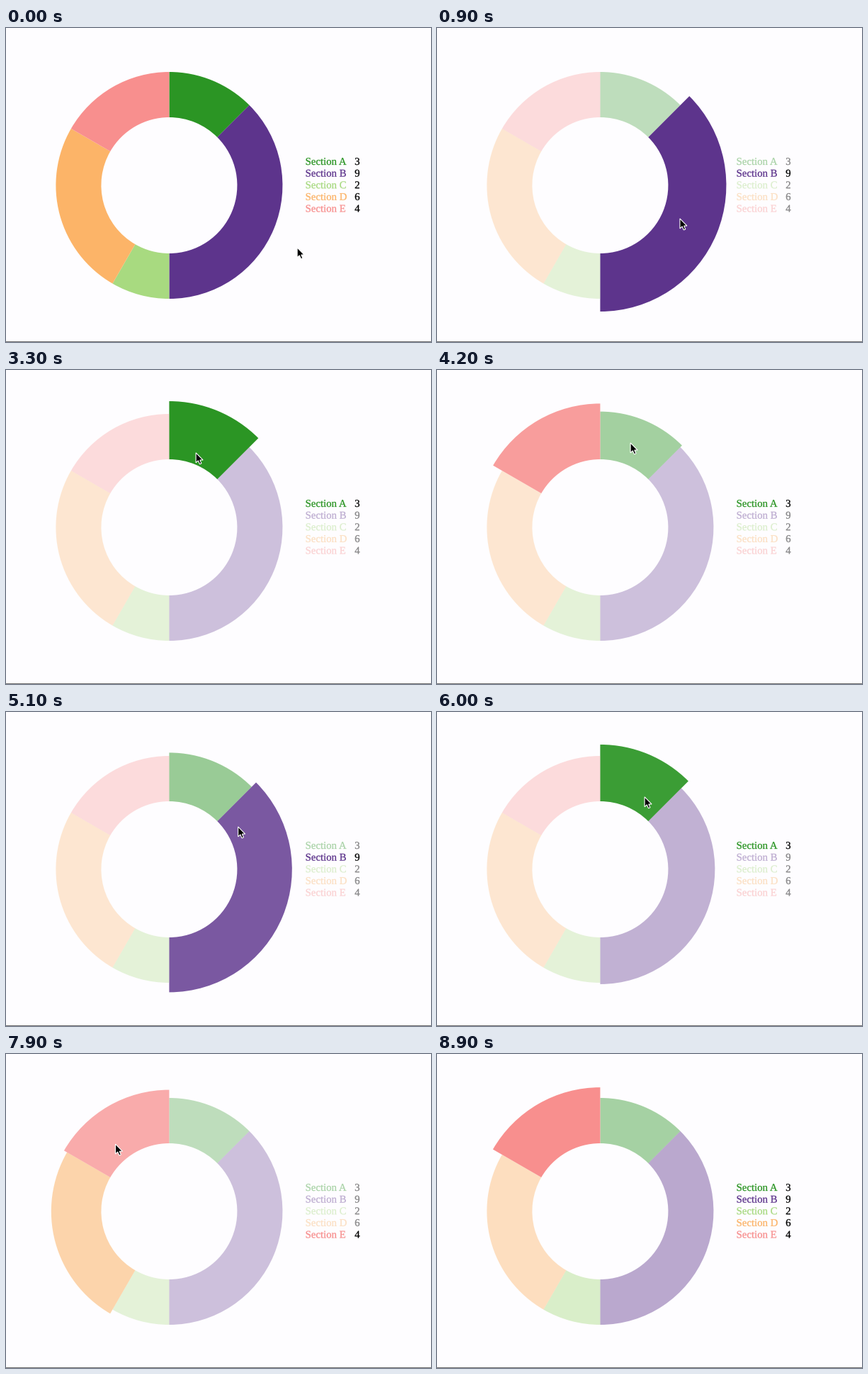
Animation, 600 px wide and 443 px high, one loop 9000 ms. Source, as a matplotlib script:

```python
import math

import matplotlib.pyplot as plt
import numpy as np
from matplotlib.animation import FuncAnimation
from matplotlib.patches import PathPatch, Polygon, Rectangle, Wedge
from matplotlib.textpath import TextPath
from matplotlib.transforms import Affine2D

W, H, DPI = 600, 443, 128
FRAMES, STEP = 90, 100
PT = 72 / DPI                      # points per pixel

CX, CY, INNER, OUTER, GROW = 230.4, 222, 96, 160, 18
DIM, FADE_MS = 0.3, 500
NAMES = "ABCDE"
VALUES = [3, 9, 2, 6, 4]
COLORS = ["#2b9524", "#5d348c", "#a8da80", "#fcb468", "#f88f8e"]
ANGLES = np.cumsum([0] + VALUES) * 360 / sum(VALUES)   # clockwise from top

# turning points of the pointer: time in ms, x, y
STOPS = np.array([
    (0, 412, 310), (700, 345, 275), (1550, 340, 250), (1900, 255, 223),
    (2500, 262, 108), (3300, 269, 117), (3690, 153, 118), (4200, 274, 103),
    (5190, 334, 168), (6000, 294, 120), (6300, 262, 143), (6925, 118, 225),
    (7100, 104, 246), (8050, 165, 105), (8500, 165, 105), (8800, 186, 32)])
ARROW = np.array([(0, 0), (0, 14), (3.2, 11), (5.4, 16), (7.8, 15),
                  (5.7, 10.2), (10, 10.2)]) - (0.9, 0.2)


def pointer_at(ms):
    return [np.interp(ms, STOPS[:, 0], STOPS[:, k]) for k in (1, 2)]


def section_at(x, y, hovered):
    """Section under the point; the hovered one reaches further out."""
    dx, dy = x - CX, y - CY
    turn = math.degrees(math.atan2(dx, -dy)) % 360
    name = NAMES[np.searchsorted(ANGLES, turn, side="right") - 1]
    outer = OUTER + GROW * (name == hovered)
    return name if INNER <= math.hypot(dx, dy) <= outer else ""


def find_hovers():
    hovers = [(-FADE_MS, "")]
    for ms in range(0, FRAMES * STEP, 5):
        name = section_at(*pointer_at(ms), hovers[-1][1])
        if name != hovers[-1][1]:
            hovers.append((ms, name))
    return hovers


HOVERS = find_hovers()


def ease(t):
    t = min(max(t, 0), 1)
    return 4 * t ** 3 if t < 0.5 else 1 - 4 * (1 - t) ** 3


def hover_state(ms):
    """Previous hover, current hover and eased progress between them."""
    k = max(i for i, (start, _) in enumerate(HOVERS) if start <= ms)
    start, now = HOVERS[k]
    return HOVERS[max(k - 1, 0)][1], now, ease((ms - start) / FADE_MS)


def mix(a, b, t):
    return a + (b - a) * t


def opacity(name, hover):
    return 1.0 if hover in ("", name) else DIM


fig = plt.figure(figsize=(W / DPI, H / DPI), dpi=DPI, facecolor="#fefdff")
ax = fig.add_axes([0, 0, 1, 1])
ax.set_xlim(0, W)
ax.set_ylim(H, 0)
ax.axis("off")
ax.add_patch(Rectangle((0, 442), W, 1, color="#6e6e6e", lw=0))


def write(x, y, text, color):
    path = TextPath((0, 0), text, size=14.8, prop={"family": "Liberation Serif"})
    place = Affine2D().scale(1, -1).translate(x, y)
    return ax.add_patch(PathPatch(place.transform_path(path), color=color,
                                  lw=0.3 * PT))


wedges, labels, counts = [], [], []
for i, (name, value, color) in enumerate(zip(NAMES, VALUES, COLORS)):
    wedge = Wedge((CX, CY), OUTER, ANGLES[i] - 90, ANGLES[i + 1] - 90,
                  width=OUTER - INNER, facecolor=color, lw=0)
    wedges.append(ax.add_patch(wedge))
    y = 193 + 16.6 * i
    labels.append(write(422.6, y, f"Section {name}", color))
    counts.append(write(492.2, y, str(value), "black"))

pointer = ax.add_patch(Polygon(ARROW, facecolor="black", edgecolor="white",
                               lw=1.1 * PT, joinstyle="miter", zorder=5))


def draw(frame):
    ms = frame * STEP
    before, now, p = hover_state(ms)
    for name, wedge, label, count in zip(NAMES, wedges, labels, counts):
        radius = OUTER + GROW * mix(before == name, now == name, p)
        wedge.set_radius(radius)
        wedge.set_width(radius - INNER)
        wedge.set_alpha(mix(opacity(name, before), opacity(name, now), p))
        lit = now in ("", name)
        label.set_alpha(1 if lit else 0.34)
        count.set_alpha(1 if lit else 0.42)
    pointer.set_xy(ARROW + pointer_at(ms))
    pointer.set_visible(ms <= STOPS[-1, 0])
    return [*wedges, *labels, *counts, pointer]


anim = FuncAnimation(fig, draw, frames=FRAMES, interval=STEP,
                     repeat=True, repeat_delay=0, blit=False)
plt.show()
```
